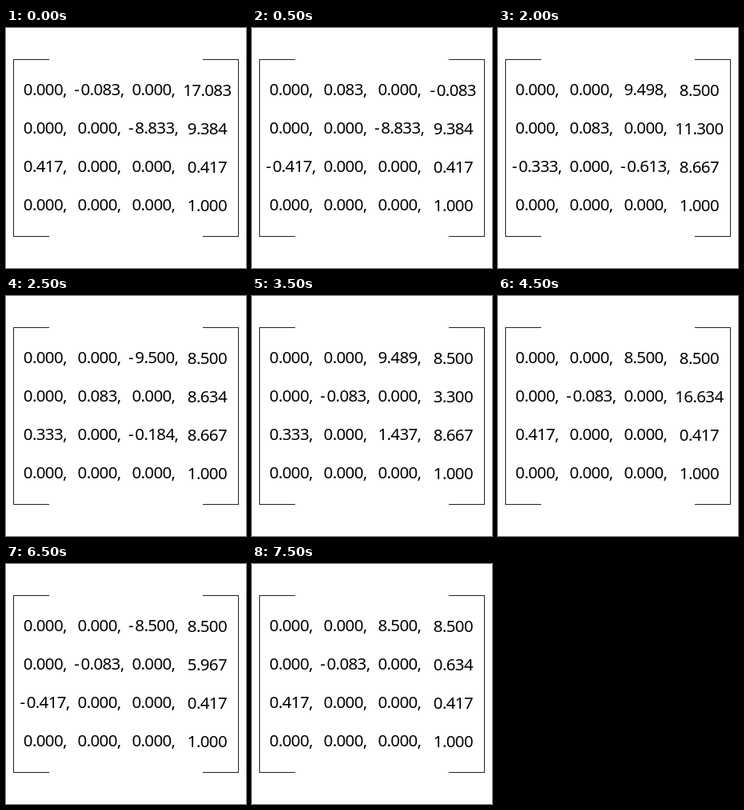
Recreate the animation shown at these times as an HTML page with a canvas. Size 300 px wide and 300 px high, loop 8 s.

```html
<!DOCTYPE html>
<html lang="en">
<head>
<meta charset="utf-8">
<title>Matrix</title>
<style>
  html, body { margin: 0; width: 100%; height: 100%; overflow: hidden; background: #fff; }
  canvas { display: block; width: 300px; height: 300px; }
</style>
</head>
<body>
<canvas id="stage"></canvas>
<script>
const STEP = 500, COUNT = 16;
const COLS = [48.8, 116.6, 184.4, 251.4];
const TILT = [1.695, 1.214, -0.613, -0.184, 0.652, 1.437, -1.142];

const canvas = document.getElementById('stage');
const ctx = canvas.getContext('2d');
const ratio = window.devicePixelRatio || 1;
canvas.width = canvas.height = 300 * ratio;
ctx.scale(ratio, ratio);

// Upright panel at either side
function post(turn) {
  return [[0, -0.083 * turn, 0, 8.5 + 8.583 * turn],
          [0, 0, -8.833, 9.384],
          [0.417 * turn, 0, 0, 0.417]];
}

const level = i => 16.6336 - i * 8 / 3;

// Tilted shelf
function shelf(i) {
  const turn = i % 4 === 2 ? -1 : 1;
  const tip = i < 4 ? 1 : -1;
  const z = TILT[i];
  return [[0, 0, -turn * tip * (9.5 - 0.0055 * z * z), 8.5],
          [0, 0.083 * tip, 0, level(i)],
          [0.333 * turn, 0, z, 8.667]];
}

// Flat front slat
function slat(i) {
  const turn = i === 4 ? -1 : 1;
  return [[0, 0, 8.5 * turn, 8.5],
          [0, -0.083, 0, level(i)],
          [0.417 * turn, 0, 0, 0.417]];
}

function matrix(k) {
  const top = k < 2 ? post(k ? -1 : 1) : k < 9 ? shelf(k - 2) : slat(k - 9);
  return [...top, [0, 0, 0, 1]];
}

function drawBrackets() {
  ctx.fillStyle = '#2b1d26';
  for (const [side, arm] of [[9, 9], [290, 246]]) {
    ctx.fillRect(side, 39, 1, 222);
    ctx.fillRect(arm, 39, 45, 1);
    ctx.fillRect(arm, 260, 45, 1);
  }
}

function drawValue(value, row, col) {
  const last = col === 3;
  const y = 84 + row * 48 + (last ? 1 : 0);
  const negative = value < 0;
  const text = Math.abs(value).toFixed(3) + (last ? '' : ',');
  const width = ctx.measureText(text).width;
  const left = COLS[col] - width / 2 + (negative ? 3.9 : 0);
  ctx.fillText(text, left, y);
  if (negative) ctx.fillText('-', left - 8.2, y);
}

function draw(k) {
  ctx.fillStyle = '#fff';
  ctx.fillRect(0, 0, 300, 300);
  drawBrackets();
  ctx.font = '20.5px "Noto Sans", "Open Sans", sans-serif';
  ctx.letterSpacing = '-0.65px';
  ctx.textBaseline = 'alphabetic';
  ctx.fillStyle = '#000';
  matrix(k).forEach((line, row) => line.forEach((v, col) => drawValue(v, row, col)));
}

const start = performance.now();
function tick(now) {
  draw(Math.floor(Math.max(0, now - start) / STEP) % COUNT);
  requestAnimationFrame(tick);
}
draw(0);
requestAnimationFrame(tick);
</script>
</body>
</html>
```
